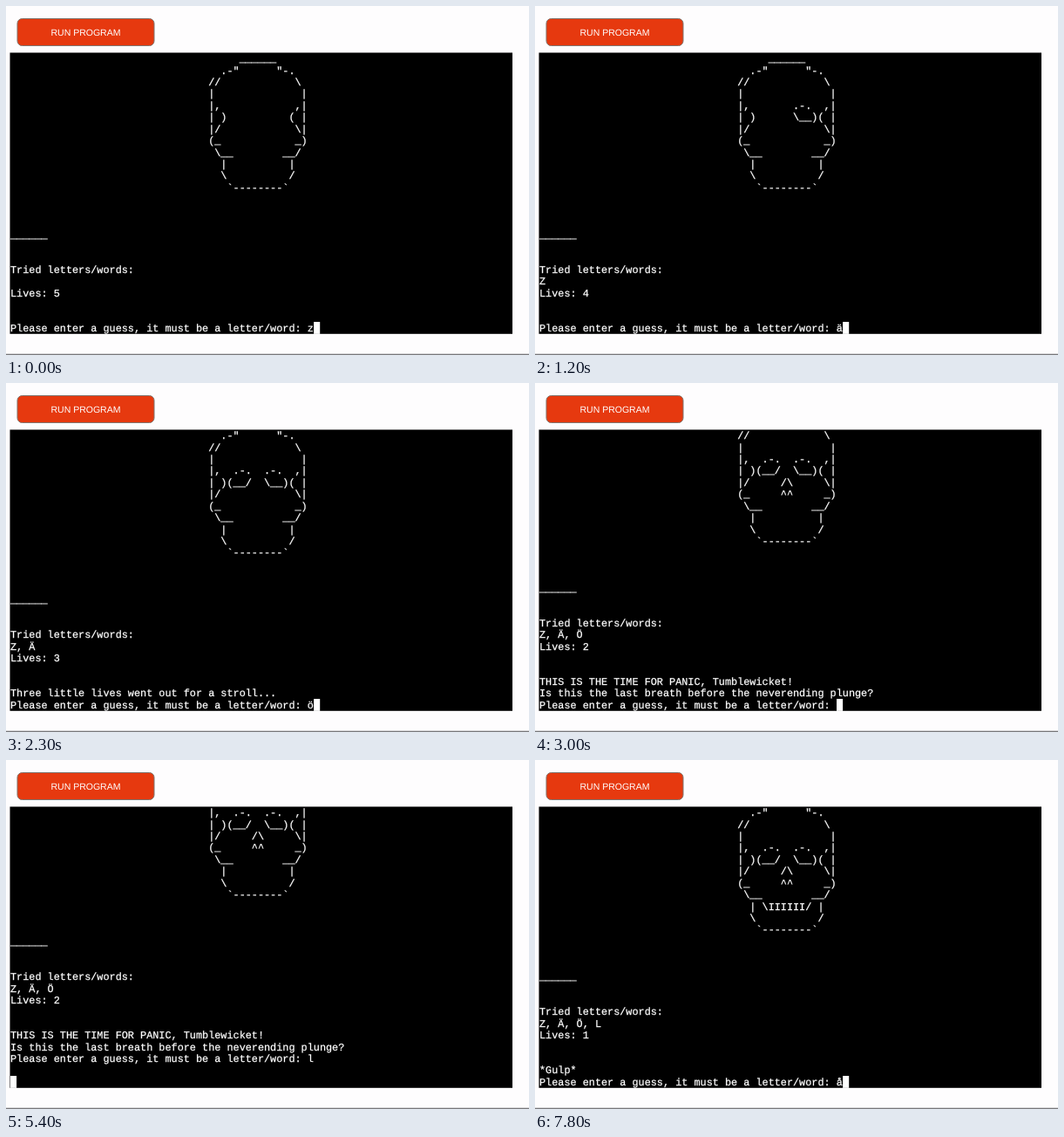
Animation of 600 by 400 pixels, one loop 8000 ms. Source, as an HTML page:

```html
<!DOCTYPE html>
<html lang="en">
<head>
<meta charset="utf-8">
<title>Hangman terminal</title>
<style>
  html, body { margin: 0; width: 100%; height: 100%; overflow: hidden; background: #fefdfe; }
  svg { display: block; width: 600px; height: 400px; }
  text { fill: #fff; text-rendering: geometricPrecision; }
  .label { font: 10.5px "Liberation Sans", Arial, sans-serif; text-anchor: middle; }
  #screen text {
    font: 11.84px "Liberation Mono", "Courier New", monospace;
    white-space: pre;
    stroke: #fff;
    stroke-width: .25px;
  }
</style>
</head>
<body>
<svg viewBox="0 0 600 400">
  <rect x="13" y="14.5" width="157" height="31" rx="5.5" fill="#e6390f" stroke="#80756f"/>
  <text class="label" x="91.5" y="34">RUN PROGRAM</text>
  <rect x="4.5" y="53.5" width="576.5" height="322.3"/>
  <g id="screen"></g>
  <rect id="cursor" fill="#fff"/>
  <rect y="398.7" width="600" height="1.3" fill="#77777a"/>
</svg>
<script>
const LOOP = 8000, ROWS = 24, LEFT = 5, TOP = 53.8, CELL_W = 7.104, CELL_H = 13.42;
const PROMPT = 'Please enter a guess, it must be a letter/word: ';
const PANIC = ['THIS IS THE TIME FOR PANIC, Tumblewicket!',
  'Is this the last breath before the neverending plunge?'];

// The skull gains one feature for every lost life.
function skull(lives) {
  const part = (limit, shape) => lives <= limit ? shape : ' '.repeat(shape.length);
  return [
    '     ______',
    '  .-"      "-.',
    '//            \\',
    '|              |',
    `|,  ${part(3, '.-.')}  ${part(4, '.-.')}  ,|`,
    `| )${part(3, '(__/')}  ${part(4, '\\__)')}( |`,
    `|/     ${part(2, '/\\')}     \\|`,
    `(_     ${part(2, '^^')}     _)`,
    ' \\__        __/',
    `  | ${part(1, '\\IIIIII/')} |`,
    '  \\          /',
    '   `--------`'
  ].map(row => ' '.repeat(32) + row);
}

function page(lives, tried, typed, messages = []) {
  return [...skull(lives), '', '', '', '______', '', '',
    'Tried letters/words:', tried, 'Lives: ' + lives, '', '',
    ...messages, PROMPT + typed];
}

const stroll = ['Three little lives went out for a stroll...'];
const panicPage = page(2, 'Z, Ä, Ö', 'l', PANIC);
const steps = [
  [0, page(5, '', 'z')],
  [100, page(4, 'Z', '')],
  [1200, page(4, 'Z', 'ä')],
  [1600, page(3, 'Z, Ä', '', stroll)],
  [2000, page(3, 'Z, Ä', 'ö', stroll)],
  [3000, page(2, 'Z, Ä, Ö', '', PANIC)],
  [4300, panicPage],
  [5400, [...panicPage, '', '']],
  [5500, page(1, 'Z, Ä, Ö, L', '', ['*Gulp*'])],
  [7800, page(1, 'Z, Ä, Ö, L', 'å', ['*Gulp*'])]
];

const screen = document.getElementById('screen');
const cursor = document.getElementById('cursor');
const rows = Array.from({ length: ROWS }, (_, i) => {
  const row = document.createElementNS('http://www.w3.org/2000/svg', 'text');
  row.setAttribute('x', LEFT);
  row.setAttribute('y', TOP + i * CELL_H + 10.4);
  return screen.appendChild(row);
});
cursor.setAttribute('y', TOP + (ROWS - 1) * CELL_H - .4);
cursor.setAttribute('width', CELL_W);
cursor.setAttribute('height', CELL_H + .4);

let shown;
function draw(now) {
  const time = now % LOOP;
  const lines = steps.findLast(([start]) => start <= time)[1];
  if (lines !== shown) {
    shown = lines;
    const visible = lines.slice(-ROWS);
    rows.forEach((row, i) => { row.textContent = visible[i]; });
    cursor.setAttribute('x', LEFT + visible[ROWS - 1].length * CELL_W);
  }
}

const start = performance.now();
function tick() {
  draw(performance.now() - start);
  requestAnimationFrame(tick);
}
tick();
</script>
</body>
</html>
```
